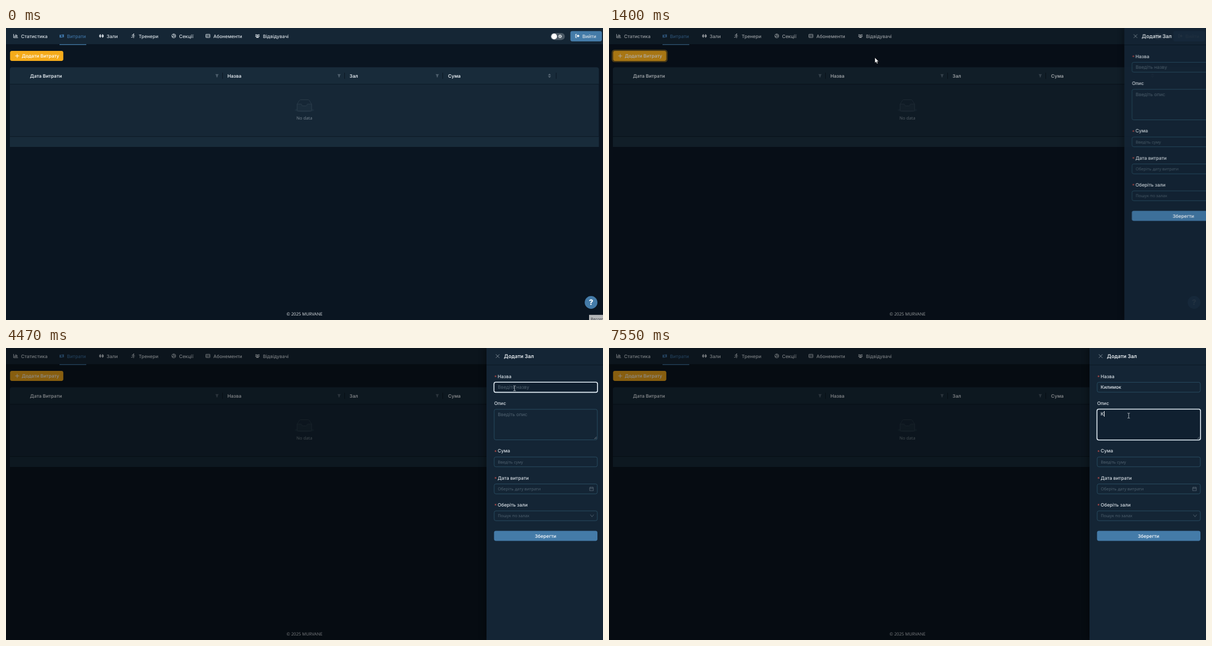
These frames come from a looping animation (1071x523 px, 8000 ms). An HTML page:

```html
<!DOCTYPE html>
<html lang="uk">
<head>
<meta charset="utf-8">
<title>Витрати</title>
<style>
html, body { margin: 0; width: 100%; height: 100%; overflow: hidden; background: #0a1521; }
#stage { position: relative; width: 1071px; height: 523px; overflow: hidden; background: #0a1521; }
svg { position: absolute; left: 0; top: 0; overflow: visible; }
text, .typed { font: 500 8.4px Inter, "Noto Sans", sans-serif; fill: #dbe2e8; color: #e6ecf1; text-rendering: geometricPrecision; white-space: pre; }
.bold text, text.bold { font-weight: 600; fill: #e6ecf1; }
text.title { font-size: 9.2px; font-weight: 600; fill: #e9eef2; }
text.sys { font: 400 7.7px "Open Sans", "Noto Sans", sans-serif; }
.hint text { fill: #526472; font-weight: 400; }
.hint text.sys { font-size: 7.4px; }
.mid { text-anchor: middle; }
.icon { fill: none; stroke: #dbe2e8; stroke-width: 1; }
.icon .f { fill: #dbe2e8; stroke: none; }
.icon.on { stroke: #3d72a3; }
.icon.on .f { fill: #3d72a3; }
text.on { fill: #3d72a3; }
.field rect { fill: none; stroke: #2b5065; stroke-width: .9; }
.ring { fill: #102030; stroke: #e4eff7; stroke-width: 1.6; }

/* Everything advances in held steps of one 8 s loop */
.anim, .typed::before { animation: 8s step-end infinite; }
#mask { position: absolute; inset: 0; background: #000; animation-name: dim; }
#drawer { position: absolute; left: 862px; top: 0; width: 209px; height: 523px; background: #142535; box-shadow: -4px 0 10px rgba(0,0,0,.3); animation-name: slide; }
#wave { animation-name: wave; }
#tip { animation-name: tip; }
#add { animation-name: hover; }
#ring1 { animation-name: ring1; }
#ring2 { animation-name: ring2; }
#hint1 { animation-name: hint1; }
#hint2 { animation-name: hint2; }
#cursor { animation-name: move; }
#arrow { animation-name: arrow; }
#hand { animation-name: hand; }
#beam { animation-name: beam; }

.typed { position: absolute; left: 20px; height: 18px; line-height: 18px; }
.typed::before { content: ""; }
#name::before { animation-name: name; }
#note::before { animation-name: note; }
.caret { display: inline-block; width: .9px; height: 10px; margin-left: .2px; vertical-align: middle; background: #fff; }
#name .caret { animation-name: caret1; }
#note .caret { animation-name: caret2; }

@keyframes tip { 0% { opacity: 1 } .875%, to { opacity: 0 } }
@keyframes hover { 0%, 16.625% { fill: #f5ab1b } 10.875% { fill: #f6af22 } to { fill: #f5ab1b } }
@keyframes dim {
  0% { opacity: 0 } 16.625% { opacity: .11 } 17.5% { opacity: .315 }
  18.375% { opacity: .41 } 19.125% { opacity: .443 } 20%, to { opacity: .45 }
}
@keyframes slide {
  0% { transform: translateX(240px); opacity: .7 }
  16.625% { transform: translateX(158px); opacity: .77 }
  17.5% { transform: translateX(62.5px); opacity: .91 }
  18.375% { transform: translateX(19px); opacity: .97 }
  19.125% { transform: translateX(3px); opacity: .995 }
  20%, to { transform: none; opacity: 1 }
}
@keyframes wave {
  0% { opacity: 0 } 16.625% { opacity: .3 } 17.5% { opacity: .4 } 20% { opacity: .32 }
  21.625% { opacity: .2 } 23.375% { opacity: .1 } 25%, to { opacity: 0 }
}
@keyframes ring1 {
  0% { opacity: 0 } 36% { opacity: .4 } 36.75% { opacity: .8 } 37.5% { opacity: 1 }
  90.875% { opacity: .5 } 91.75%, to { opacity: 0 }
}
@keyframes ring2 { 0% { opacity: 0 } 90.875% { opacity: .4 } 91.75% { opacity: .8 } 92.5%, to { opacity: 1 } }
@keyframes hint1 { 0% { opacity: 1 } 58.375%, to { opacity: 0 } }
@keyframes hint2 { 0% { opacity: 1 } 94.375%, to { opacity: 0 } }
@keyframes name {
  0% { content: "" } 58.375% { content: "К" } 63.375% { content: "Ки" } 66.75% { content: "Кили" }
  71.75% { content: "Килим" } 73% { content: "Килимо" } 74.25%, to { content: "Килимок" }
}
@keyframes note { 0% { content: "" } 94.375%, to { content: "К" } }
@keyframes caret1 {
  0%, 42.75%, 55.875%, 80.875%, 90.875%, to { opacity: 0 }
  36%, 49.25%, 58.375%, 87.5% { opacity: 1 }
}
@keyframes caret2 { 0% { opacity: 0 } 90.875%, to { opacity: 1 } }
@keyframes arrow { 0%, 16.625%, 86.625% { opacity: 1 } 10.875%, 22.5%, 89.125%, to { opacity: 0 } }
@keyframes hand { 0%, 16.625%, to { opacity: 0 } 10.875% { opacity: 1 } }
@keyframes beam { 0%, 86.625% { opacity: 0 } 22.5%, 89.125%, to { opacity: 1 } }
@keyframes move {
  0% { transform: translate(1100px, 540px) }
  .875% { transform: translate(930px, 470px) }
  1.75% { transform: translate(720px, 390px) }
  2.5% { transform: translate(560px, 330px) }
  3.5% { transform: translate(481px, 303px) }
  6% { transform: translate(440px, 270px) }
  6.875% { transform: translate(345px, 205px) }
  7.625% { transform: translate(230px, 140px) }
  8.5% { transform: translate(140px, 95px) }
  9.25% { transform: translate(85px, 70px) }
  10% { transform: translate(60px, 61px) }
  10.875% { transform: translate(52px, 58px) }
  12.5% { transform: translate(52px, 55px) }
  14.125% { transform: translate(52px, 53px) }
  16.625% { transform: translate(190px, 57px) }
  17.5% { transform: translate(477px, 53px) }
  18.375% { transform: translate(640px, 50px) }
  19.125% { transform: translate(760px, 47px) }
  20% { transform: translate(837px, 47px) }
  20.875% { transform: translate(870px, 52px) }
  21.625% { transform: translate(888px, 58px) }
  22.5% { transform: translate(899px, 64px) }
  23.375% { transform: translate(906px, 68px) }
  24.125% { transform: translate(910px, 71px) }
  25% { transform: translate(912px, 72px) }
  85% { transform: translate(916px, 73px) }
  85.875% { transform: translate(921px, 78px) }
  86.625% { transform: translate(925px, 86px) }
  87.5% { transform: translate(928px, 96px) }
  88.375% { transform: translate(930px, 107px) }
  89.125% { transform: translate(931px, 115px) }
  90%, to { transform: translate(932px, 121px) }
}
</style>
</head>
<body>
<div id="stage">
  <svg width="1071" height="523">
    <defs>
      <path id="funnel" fill="#4f606e" d="M-3-2.8H3L1 .3V2.8H-1V.3Z"/>
      <path id="split" stroke="#0b1722" d="M0 80V91"/>
    </defs>

    <!-- Navigation -->
    <rect width="1071" height="29" fill="#152635"/>
    <rect x="96" y="29" width="48" height="1.3" fill="#447ba8"/>
    <g class="icon" transform="translate(13 10)"><path d="M.7 .8V7.3H8.5"/><path d="M2.8 6V3.8M4.7 6V1.5M6.6 6V2.8" stroke-width="1.2"/></g>
    <g class="icon on" transform="translate(96 10)"><path class="f" d="M0 2C2.7 3.2 5.3 .6 8 1.8V6.8C5.3 5.6 2.7 8.2 0 7Z"/><circle cx="4" cy="4.4" r="1.3" fill="#152635" stroke="none"/></g>
    <g class="icon" transform="translate(167 10)"><path d="M0 4.3H8.4"/><path d="M2.3 1.3V7.3M6.1 1.3V7.3" stroke-width="1.5"/><path d="M.9 2.3V6.3M7.5 2.3V6.3"/></g>
    <g class="icon" transform="translate(224 10)"><circle class="f" cx="5" cy="1" r="1"/><path d="M1.6 3.6L2.7 2.3L4.6 2.6L3.6 5L5.3 6L4.8 8.2M3.4 5.4L2.6 6.7H.6M4.7 2.8L5.7 4.2H7.2"/></g>
    <g class="icon" transform="translate(297 10)" stroke-width=".7"><circle cx="4" cy="4.2" r="3.6" stroke-width=".8"/><path d="M4 4.2V.7M4 4.2L1 6M4 4.2L7 6M2 1.4Q4.4 1.6 5.6 3.2M1.4 4Q2 6.3 4 7.5M6.7 2.5Q6.4 4.8 4.6 6" stroke-width=".7"/></g>
    <g class="icon" transform="translate(358 10)"><rect x=".5" y="1.3" width="7.4" height="5.8" rx=".6" stroke-width=".9"/><circle class="f" cx="2.8" cy="3.4" r=".9"/><path d="M1.5 5.6H4.1M5 3.3H7M5 5H7" stroke-width=".8"/></g>
    <g class="icon" transform="translate(447 10)"><g class="f"><circle cx="1.6" cy="2.3" r="1.1"/><circle cx="6.6" cy="2.3" r="1.1"/><circle cx="4.1" cy="3" r="1.3"/><path d="M0 5.4Q0 3.7 1.8 3.8L2.7 4.7L1.7 5.4ZM8.2 5.4Q8.2 3.7 6.4 3.8L5.5 4.7L6.5 5.4ZM1.7 7.4Q1.7 4.8 4.1 4.8T6.5 7.4Z"/></g></g>
    <text x="27" y="17.7">Статистика</text>
    <text x="109.5" y="17.7" class="on">Витрати</text>
    <text x="180.5" y="17.7">Зали</text>
    <text x="238" y="17.7">Тренери</text>
    <text x="310.5" y="17.7">Секції</text>
    <text x="372" y="17.7">Абонементи</text>
    <text x="461" y="17.7">Відвідувачі</text>

    <rect x="977" y="9" width="25.5" height="12.4" rx="6.2" fill="#4b5965"/>
    <circle cx="983.4" cy="15.2" r="5.1" fill="#fff"/>
    <g fill="none" stroke="#eef2f5"><circle cx="994" cy="15" r="2.5" stroke-width="1.4" stroke-dasharray="1.2 .75"/><circle cx="994" cy="15" r="1.5" stroke-width=".9"/></g>
    <rect x="1012.5" y="5.5" width="56.5" height="18.5" rx="3.4" fill="#447ba8"/>
    <g class="icon" transform="translate(1021 10.5)"><path d="M3 .9H.9V6.7H3" stroke="#fff"/><path d="M2.6 2.8H4.8V1L8 3.8L4.8 6.6V4.8H2.6Z" fill="#fff" stroke="none"/></g>
    <text x="1034" y="17.7">Вийти</text>

    <!-- Add button -->
    <rect id="wave" class="anim" x="6" y="40" width="98" height="20" rx="4" fill="none" stroke="#f5ab1b" stroke-width="2.4"/>
    <rect id="add" class="anim" x="7.3" y="41" width="95.5" height="18" rx="3.4" fill="#f5ab1b"/>
    <path d="M16.5 50H23.7M20.1 46.4V53.6" stroke="#fff" stroke-width=".9"/>
    <text x="28.3" y="53" style="fill:#fff">Додати Витрату</text>

    <!-- Table -->
    <path d="M7 213V74.5Q7 70.5 11 70.5H1059.5Q1063.5 70.5 1063.5 74.5V213Z" fill="#162736"/>
    <path d="M7 100.5V74.5Q7 70.5 11 70.5H1059.5Q1063.5 70.5 1063.5 74.5V100.5Z" fill="#182b3a"/>
    <rect x="7" y="195" width="1056.5" height="18" fill="#182b3a"/>
    <path d="M7 100.7H1063.5M7 194.5H1063.5" stroke="#0c1925"/>
    <g class="bold">
      <text x="43" y="88.5">Дата Витрати</text>
      <text x="397.3" y="88.5">Назва</text>
      <text x="616.3" y="88.5">Зал</text>
      <text x="793" y="88.5">Сума</text>
    </g>
    <use href="#funnel" x="378.5" y="85.5"/><use href="#funnel" x="597.5" y="85.5"/><use href="#funnel" x="773.7" y="85.5"/>
    <path d="M972.3 84.7L975 81.8L977.7 84.7ZM972.3 86.3L975 89.2L977.7 86.3Z" fill="#5a6a77"/>
    <use href="#split" x="388.5"/><use href="#split" x="607.5"/><use href="#split" x="783.5"/><use href="#split" x="987"/>
    <ellipse cx="535.3" cy="147" rx="17.5" ry="3.6" fill="#1c2f3e"/>
    <path d="M522.3 136.2L526.7 129.3Q527.2 128.5 528.2 128.5H542.3Q543.3 128.5 543.8 129.3L548.2 136.2V147.2Q548.2 148.7 546.7 148.7H523.8Q522.3 148.7 522.3 147.2Z" fill="#162736" stroke="#2f414f" stroke-width=".8"/>
    <path d="M522.3 136.2H529.3Q530.3 136.2 530.4 137.4Q530.7 139.5 532.2 139.5H538.3Q539.8 139.5 540.1 137.4Q540.2 136.2 541.2 136.2H548.2V147.2Q548.2 148.7 546.7 148.7H523.8Q522.3 148.7 522.3 147.2Z" fill="#1b2d3c" stroke="#2f414f" stroke-width=".8"/>
    <text x="535.3" y="164" class="sys mid" style="fill:#7c8994">No data</text>

    <!-- Footer -->
    <text x="535.5" y="514.5" class="sys mid" style="fill:#e2e7eb">© 2025 MURVANE</text>
    <circle cx="1049.6" cy="491.5" r="11.4" fill="#447ba8"/>
    <text x="1049.6" y="496.3" class="mid" style="font-size:13.5px;font-weight:800;fill:#fff">?</text>
    <g id="tip" class="anim">
      <rect x="1046" y="513.8" width="30" height="14" fill="#b4b6b8"/>
      <text x="1049" y="524.3" class="sys" style="font-size:7.2px;fill:#33383c">Record</text>
    </g>
  </svg>

  <div id="mask" class="anim"></div>

  <div id="drawer" class="anim">
    <svg width="209" height="523">
      <path d="M0 30.3H209" stroke="#0c1925"/>
      <path d="M16.8 11.4L23.2 17.8M23.2 11.4L16.8 17.8" stroke="#8d99a3" stroke-width=".9"/>
      <text x="31.3" y="17.8" class="title">Додати Зал</text>
      <g style="font-size:8px">
        <text x="14" y="54.6" style="fill:#c4504b">*</text>
        <text x="14" y="188.6" style="fill:#c4504b">*</text>
        <text x="14" y="236.8" style="fill:#c4504b">*</text>
        <text x="14" y="285.2" style="fill:#c4504b">*</text>
      </g>
      <text x="20" y="53.5">Назва</text>
      <text x="13.7" y="102">Опис</text>
      <text x="20" y="187.4">Сума</text>
      <text x="20" y="235.6">Дата витрати</text>
      <text x="20" y="284">Оберіть зали</text>
      <g class="field">
        <rect x="13.8" y="61.4" width="185" height="17.7" rx="3"/>
        <rect x="13.8" y="109.8" width="185" height="54.7" rx="3"/>
        <rect x="13.8" y="195.2" width="185" height="17.5" rx="3"/>
        <rect x="13.8" y="243.5" width="185" height="17.7" rx="3"/>
        <rect x="13.8" y="291.8" width="185" height="17.5" rx="3"/>
      </g>
      <rect id="ring1" class="ring anim" x="13.4" y="61.2" width="185.8" height="18.2" rx="3.2"/>
      <rect id="ring2" class="ring anim" x="13.4" y="109.5" width="185.8" height="55.2" rx="3.2"/>
      <path d="M193.5 163L197.5 159M195.8 163L197.5 161.3" stroke="#9aa5ae" stroke-width=".7"/>
      <g class="hint">
        <text id="hint1" class="anim" x="20.2" y="73.3">Введіть назву</text>
        <text id="hint2" class="anim" x="20.2" y="121.5">Введіть опис</text>
        <text x="20.2" y="206.7" class="sys">Введіть суму</text>
        <text x="20.2" y="255" class="sys">Оберіть дату витрати</text>
        <text x="20.2" y="303.3" class="sys">Пошук по залах</text>
      </g>
      <g fill="none" stroke="#5d6d7a" stroke-width=".8">
        <path d="M185 249.7H191.7V255.6H185ZM185 251.9H191.7M186.8 248.6V250.4M189.9 248.6V250.4"/>
        <path d="M186.3 298.4L189.3 302.4L192.3 298.4"/>
      </g>
      <rect x="13.5" y="327.5" width="185.5" height="18" rx="3.4" fill="#447ba8"/>
      <text x="106" y="339.5" class="mid" style="fill:#fff">Зберегти</text>
    </svg>
    <div class="typed" id="name" style="top:61.5px"><i class="caret anim"></i></div>
    <div class="typed" id="note" style="top:109.7px"><i class="caret anim"></i></div>
  </div>

  <svg width="1071" height="523">
    <g id="cursor" class="anim">
      <path id="arrow" class="anim" d="M0 0V9.6L2.2 7.6L3.7 11L5.3 10.3L3.8 7H6.7Z" fill="#fff" stroke="#111" stroke-width=".5"/>
      <path id="hand" class="anim" d="M-1.1 1Q-1.1 0 0 0T1.1 1V4.2Q2.3 3.8 2.7 4.7Q3.9 4.4 4.2 5.2Q5.6 5 5.6 6.4V9Q5.6 10.4 4.5 11.2V12.8H-.9V11.6Q-2.4 10-3.8 7.6Q-4.2 6.4-3.2 6.2Q-2.4 6.1-1.1 7.6Z" fill="#fff" stroke="#111" stroke-width=".6"/>
      <path id="beam" class="anim" d="M-1.8-4.2H-.5L.3-3.8L1.1-4.2H2.4M.3-3.8V4.2M-1.8 4.6H-.5L.3 4.2L1.1 4.6H2.4" fill="none" stroke="#d9dfe4" stroke-width=".8"/>
    </g>
  </svg>
</div>
</body>
</html>
```
